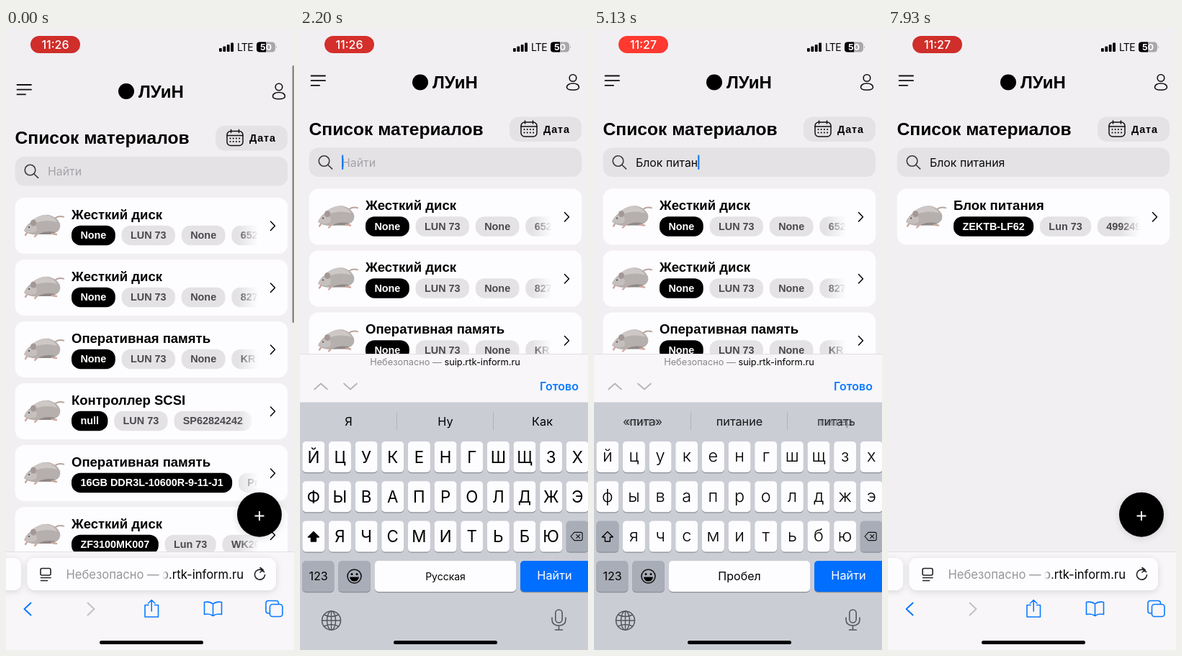
Write an HTML page that moves like this. It is 400 by 865 pixels and loops after 8000 ms.

```html
<!DOCTYPE html>
<html lang="ru">
<head>
<meta charset="utf-8">
<style>
html, body { margin: 0; width: 100%; height: 100%; overflow: hidden; background: #f2eff2; }
svg { display: block; width: 100%; height: 100%; }
text { font-family: Inter, Roboto, sans-serif; white-space: pre; }
.b { font-family: "Liberation Sans", Arial, sans-serif; font-weight: 700; }
.line { fill: none; stroke-linecap: round; stroke-linejoin: round; }
</style>
</head>
<body>
<svg id="stage" viewBox="0 0 400 865" preserveAspectRatio="none"></svg>
<script>
const LOOP = 8000, SHOW = 733, HIDE = 6030, RESULTS = 6650;
const RUSSIAN = 1500, SEARCH = 5820;
const BLUE = '#0a7aff', CARD = '#fdfcfe', GREY = '#a9adb8';
const FIELD_SIZE = 15.85;
const FIELD_FONT = `${FIELD_SIZE}px Inter, Roboto, sans-serif`;
const CHIP_FONT = '700 14.4px "Liberation Sans", Arial, sans-serif';

const pen = document.createElement('canvas').getContext('2d');
const measure = (s, font) => { pen.font = font; return pen.measureText(s).width; };
const clamp = (v) => Math.max(0, Math.min(1, v));
const mix = (a, b, k) => a + (b - a) * k;

// SVG string helpers
const text = (x, y, s, size, extra = '') => `<text x="${x}" y="${y}" font-size="${size}" ${extra}>${s}</text>`;
const mid = (x, cy, s, size, extra = '') => text(x, cy + size * 0.36, s, size, `text-anchor="middle" ${extra}`);
const box = (x, y, w, h, r, fill, extra = '') => `<rect x="${x}" y="${y}" width="${w}" height="${h}" rx="${r}" fill="${fill}" ${extra}/>`;
const line = (d, color = '#000', w = 1.7, extra = '') => `<path class="line" d="${d}" stroke="${color}" stroke-width="${w}" ${extra}/>`;
const group = (id, body, extra = '') => `<g id="${id}" ${extra}>${body}</g>`;

function rat() {
  return `<path d="M66 30Q73 24 81 27" fill="none" stroke="#b9a49d" stroke-width="1.8"/>
    <path d="M25 46Q28 38 36 33Q47 22 60 24Q71 27 75 36Q77 45 68 49L46 51Q33 53 25 46Z" fill="#b5afad"/>
    <path d="M38 30Q49 22 60 25Q68 28 71 34Q55 29 38 36Z" fill="#cdc8c6"/>
    <path d="M25 46Q29 37 38 36Q45 40 42 47Q34 51 25 46Z" fill="#c5bfbd"/>
    <ellipse cx="38" cy="35" rx="4" ry="4.500" fill="#a39896"/>
    <path d="M46 50Q56 45 68 48L66 51H46Z" fill="#8f8886"/>
    <circle cx="32" cy="41" r="1.100" fill="#4a4444"/>
    <path d="M29 49l-2 3M43 51l-3 3M64 50l6 1" stroke="#cda89f" stroke-width="2.400" stroke-linecap="round"/>`;
}

function card(y, title, chips) {
  let x = 91, row = '';
  chips.forEach((s, i) => {
    const w = measure(s, CHIP_FONT) + 24.8;
    row += box(x, 38.7, w, 27.5, 12.5, i ? '#e4e2e5' : '#000') +
      text(x + 12.4, 57.3, s, 14.4, `class="b" fill="${i ? '#4b494d' : '#fff'}"`);
    x += w + 8.8;
  });
  return `<g transform="translate(0 ${y})">${box(12.6, 0, 378.6, 78, 13, CARD)}${rat()}
    ${text(91, 29.5, title, 18.5, 'class="b"')}
    <g clip-path="url(#row)">${row}</g>${box(322, 36, 28, 33, 0, 'url(#fade)')}
    ${line('M367.5 33l6 6.2l-6 6.2', '#000', 1.5)}</g>`;
}

const items = [
  ['Жесткий диск', ['None', 'LUN 73', 'None', '652731']],
  ['Жесткий диск', ['None', 'LUN 73', 'None', '827164']],
  ['Оперативная память', ['None', 'LUN 73', 'None', 'KR 205']],
  ['Контроллер SCSI', ['null', 'LUN 73', 'SP62824242']],
  ['Оперативная память', ['16GB DDR3L-10600R-9-11-J1', 'Pr 04']],
  ['Жесткий диск', ['ZF3100MK007', 'Lun 73', 'WK2081']]
];

function header() {
  let dots = '';
  for (let i = 0; i < 8; i++) dots += `<circle cx="${311.5 + (i % 4) * 4.2}" cy="${153.5 + (i >> 2) * 4.6}" r="1"/>`;
  return line('M15.5 79h19.5M15.5 85.7h19.5M15.5 92.4h11.5', '#111', 1.8) +
    '<circle cx="167" cy="88" r="11"/>' +
    text(184, 96.5, 'ЛУиН', 24, 'class="b"') +
    `<circle class="line" cx="379" cy="82" r="4.8" stroke="#111" stroke-width="1.6"/>` +
    line('M379 89.5c-5 0-8.5 2.2-8.5 5.2s3.5 4 8.5 4s8.5-1 8.5-4s-3.5-5.2-8.5-5.2z', '#111', 1.6) +
    text(12.6, 161.3, 'Список материалов', 24.6, 'class="b"') +
    box(291, 136, 100, 34.5, 13, '#e5e2e5') +
    `<rect class="line" x="307" y="143.5" width="22" height="20" rx="5" stroke="#111" stroke-width="1.5"/>` +
    line('M307 149.5h22M312.5 141.5v4M323.5 141.5v4', '#111', 1.5) + dots +
    text(338, 158.2, 'Дата', 14.4, 'class="b" letter-spacing="0.9"') +
    box(12.6, 179, 378.6, 40.5, 13, '#e4e2e5') +
    `<circle class="line" cx="33.5" cy="197.5" r="7.3" stroke="#3b393c" stroke-width="1.6"/>` +
    line('M39 203l5.6 5.4', '#3b393c', 1.6) +
    `<text id="query" x="58" y="205" font-size="${FIELD_SIZE}"></text>` + box(58, 189, 2.2, 20.5, 1, '#1c7cf2', 'id="caret"');
}

const status = () => box(34, 11, 69, 24, 12, '#ff3b30', 'id="pill"') +
  `<text id="clock" x="68.5" y="28.7" font-size="16" font-weight="500" text-anchor="middle" fill="#fff"></text>` +
  [5, 7.5, 10, 12.5].map((h, i) => box(296 + i * 5.4, 33 - h, 3.8, h, 1, '#000')).join('') +
  text(321, 32.3, 'LTE', 14, 'letter-spacing="-0.7"') +
  box(348, 19.5, 26, 14, 4.3, '#a9a7aa') + '<path d="M361 19.5h-8.700q-4.300 0-4.300 4.300v5.400q0 4.300 4.300 4.300h8.700z"/>' +
  '<path d="M375 24.500q2 2 0 4z" fill="#a9a7aa"/>' + mid(361, 26.6, '50', 12.3, 'font-weight="700" fill="#fff"');

const tools = () => line('M34.500 799.500l-9 8.500l9 8.500', BLUE, 2) + line('M113.500 799.500l9 8.500l-9 8.500', '#c3c1c5', 2) +
  line('M198 802.500h-5v16.500h18.500v-16.500h-5M202.200 811v-15M197.500 800l4.700-4.500l4.700 4.500', BLUE, 1.6) +
  line('M287.500 801q-4.500-4-12-2.500v17q7.500-1.500 12 2q4.500-3.500 12-2v-17q-7.500-1.500-12 2.500v16.500', BLUE, 1.6) +
  `<rect class="line" x="366.500" y="801.500" width="17.500" height="17" rx="3.500" stroke="${BLUE}" stroke-width="1.600"/>` +
  line('M366 814h-1.500q-3.500 0-3.500-3.500v-10.500q0-3.500 3.500-3.500h10.500q3.500 0 3.500 3.500v1', BLUE, 1.6);

// Address card, drawn around y = 0
const address = () => group('plate',
  box(-20, -22.5, 41, 45, 10, CARD, 'filter="url(#soft)"') + box(29.5, -22.5, 345.5, 45, 11, CARD, 'filter="url(#soft)"')) +
  group('marks', `<rect class="line" x="48" y="-8" width="14" height="9.500" rx="2" stroke="#222" stroke-width="1.600"/>` +
    line('M48.5 5h13.500M48.5 9h9', '#222', 1.6) +
    line('M358.500 -3a7 7 0 1 0 1 4M353 -9l4 3l-4 3.500', '#222', 1.6)) +
  group('long', text(83.5, 6, 'Небезопасно —', 16.6, 'fill="#98969a"') +
    `<g clip-path="url(#host)">${text(330, 6, 'suip.rtk-inform.ru', 16.6, 'text-anchor="end"')}</g>` +
    box(217, -14, 13, 28, 0, 'url(#hostFade)')) +
  group('short', mid(201.5, 0, '<tspan fill="#88868a">Небезопасно — </tspan>suip.rtk-inform.ru', 12.8));

const ROWS = [575, 630.3, 685.6, 741];
const key = (x, y, w, fill = CARD, extra = '') => box(x, y + 1.2, w, 43, 5, '#8b8e96') + box(x, y, w, 43, 5, fill, extra);
const keyAt = (i) => 3.3 + 36.65 * i;

function shiftArrow(cx, cy, on) {
  return `<path d="M${cx} ${cy - 7}l7.500 7.500h-4v6h-7v-6h-4z" fill="${on ? '#000' : 'none'}" stroke="#000" stroke-width="1.300" stroke-linejoin="round"/>`;
}
const eraser = (cx, cy, k) => `<g transform="translate(${cx} ${cy}) scale(${k})">` +
  line('M-5 -8h13q3 0 3 3v10q0 3-3 3h-13l-7-8zM-1 -3.500l7 7M6 -3.500l-7 7', '#111', 1.6) + '</g>';

function letters(rows, xs, w, upper) {
  const style = `font-weight="${upper ? 400 : 300}"`;
  return rows.map((row, r) => [...row].map((c, i) => {
    const x = xs(r, i);
    return key(x, ROWS[r], w) + (upper
      ? mid(x + w / 2, ROWS[r] + 21.5, c, 22.3, style)
      : mid(x + w / 2, ROWS[r] + 20, c.toLowerCase(), 23.5, style));
  }).join('')).join('');
}

const LATIN = ['QWERTYUIOP', 'ASDFGHJKL', 'ZXCVBNM'];
const CYRILLIC = ['ЙЦУКЕНГШЩЗХ', 'ФЫВАПРОЛДЖЭ', 'ЯЧСМИТЬБЮ'];

const latin = () => letters(LATIN, (r, i) => 3.3 + 40.3 * (i + [0, 0.5, 1.5][r]), 34.6, true) +
  key(3.3, ROWS[2], 45.5) + `<g transform="translate(26 707) scale(1.4)">${shiftArrow(0, 0, true)}</g>` +
  key(355, ROWS[2], 48, GREY) + eraser(377.5, 707, 1);

const cyrillic = (upper) => letters(CYRILLIC, (r, i) => keyAt(i + (r === 2 ? 1 : 0)), 31, upper) +
  key(keyAt(0), ROWS[2], 31, upper ? CARD : GREY) + shiftArrow(18.8, 707.5, upper) +
  key(keyAt(10), ROWS[2], 31, GREY) + eraser(384.5, 707, 0.7);

function bottomRow() {
  const y = ROWS[3];
  return key(3.3, y, 44, GREY) + mid(25.5, y + 21.5, '123', 16) +
    key(53.3, y, 44.5, GREY) +
    `<circle class="line" cx="75.500" cy="762.500" r="9.500" stroke="#111" stroke-width="1.600"/>
     <circle cx="72" cy="759.500" r="1.500"/><circle cx="79" cy="759.500" r="1.500"/>
     <path d="M69 763.500h13q-1 6-6.500 6t-6.500-6z"/>` +
    key(104, y, 196, CARD, 'id="space"') +
    mid(202, y + 21, 'Пробел', 16, 'id="spaceLabel"') + mid(202, y + 22, 'Русская', 14, 'id="language"') +
    text(294, y + 37.5, 'EN FR', 10, 'id="tongues" text-anchor="end" fill="#b6b4b9" font-weight="300"') +
    key(306, y, 100, '#006eff', 'id="go"') +
    `<text id="goLabel" x="353.500" y="767" font-size="16.300" text-anchor="middle"></text>`;
}

const footer = () => `<g class="line" stroke="#55575d" stroke-width="1.500"><circle cx="43.500" cy="824" r="13"/>
  <ellipse cx="43.500" cy="824" rx="6" ry="13"/></g>` +
  line('M30.500 824h26M43.500 811v26M33.500 816q10 5 20 0M33.500 832q10-5 20 0', '#55575d', 1.4) +
  `<rect class="line" x="354.800" y="809" width="9.400" height="18" rx="4.700" stroke="#55575d" stroke-width="1.600"/>` +
  line('M350 820v2.500q0 8.500 9.500 8.500t9.500-8.500v-2.500M359.500 831v6M354.500 837h10', '#55575d', 1.6);

const keyboard = () => box(0, 520, 400, 400, 0, '#cbcdd5') + box(0, 476, 400, 44.5, 0, '#f8f6f9') +
  line('M20 502.500l9-8l9 8M61 494.500l9 8l9-8', '#b5b3b8', 1.7) +
  text(387, 504, 'Готово', 16, `text-anchor="end" font-weight="600" fill="${BLUE}"`) +
  line('M134.500 535v24M268.500 535v24', '#b0b3bb', 1) +
  box(134, 527, 135.5, 40, 6, '#e3e5ea', 'id="pick"') +
  group('hints', [0, 1].map(() => `<g>${[67.5, 202, 336.5].map((x) => mid(x, 547.5, '', 16.3)).join('')}</g>`).join('')) +
  group('latin', latin()) + group('upper', cyrillic(true)) + group('lower', cyrillic(false)) +
  bottomRow() + footer() +
  group('pop', `<path fill="${CARD}" filter="url(#soft)"/>` + mid(0, 0, '', 36, 'font-weight="300"'));

const gradient = (id, color, from, to) => `<linearGradient id="${id}"><stop stop-color="${color}" stop-opacity="${from}"/>
  <stop offset="1" stop-color="${color}" stop-opacity="${to}"/></linearGradient>`;

const stage = document.getElementById('stage');
stage.innerHTML = `<defs>${gradient('fade', CARD, 0, 1)}${gradient('hostFade', CARD, 1, 0)}
  <clipPath id="row"><rect x="91" y="30" width="258.500" height="45"/></clipPath>
  <clipPath id="host"><rect x="218" y="-20" width="120" height="40"/></clipPath>
  <filter id="soft" x="-20%" y="-40%" width="140%" height="190%"><feDropShadow dx="0" dy="2" stdDeviation="5" flood-opacity="0.130"/></filter></defs>` +
  box(0, 0, 400, 865, 0, '#f2eff2') +
  group('page', header() + group('all', items.map((it, i) => card(236 + 86 * i, ...it)).join('')) +
    group('found', card(236, 'Блок питания', ['ZEKTB-LF62', 'Lun 73', '499249']))) +
  '<circle cx="352" cy="676.700" r="31" filter="url(#soft)"/>' + line('M345.500 678.500h13M352 672v13', '#fff', 2, 'style="stroke-linecap:butt"') +
  box(397.6, 52, 3, 358, 1.5, '#89878b', 'id="scroll"') + status() +
  box(0, 728, 400, 500, 0, '#f8f6f8', 'id="bar"') + box(0, 728, 400, 0.8, 0, '#dcdade', 'id="edge"') +
  group('tools', tools()) + group('address', address()) + box(0, 453, 0, 2.6, 0, '#4ba0f2', 'id="progress"') +
  group('keyboard', keyboard()) + box(130, 852, 144, 5, 2.5, '#000');

const el = {};
stage.querySelectorAll('[id]').forEach((n) => { el[n.id] = n; });
const set = (n, attrs) => { for (const k in attrs) n.setAttribute(k, attrs[k]); };
const show = (n, on) => set(n, { opacity: +on });
const shift = (n, y) => set(n, { transform: `translate(0 ${y})` });

const PHRASE = 'Блок питания';
const PRESSES = [2480, 2790, 3060, 3320, 3570, 3850, 4120, 4390, 4660, 4930, 5200, 5480];

const HINTS = [
  [-500, 'I', 'The', 'I’m'], [RUSSIAN, 'Я', 'Ну', 'Как'],
  [2620, '«Б»', 'Была', 'Без'], [2930, '«Бл»', 'До', 'Благодарю', true],
  [3450, '«Блок»', 'Блока', 'Блоки'], [3700, 'и', 'на', 'в'], [3990, '«п»', 'по', 'при'],
  [4320, '«пи»', 'пиител', 'писать'], [4790, '«пит»', 'питание', 'питер'],
  [5060, '«пита»', 'питание', 'питать'], [5330, '«питан»', 'питания', 'питание'],
  [5610, '«питания»', 'питания', 'питание'], [5885, 'Для', 'На', 'В']
];

const spring = (ms) => ms < 0 ? 1 : (1 + 0.01826 * ms) * Math.exp(-0.01826 * ms);

function drawHints(t) {
  let n = 0;
  while (n + 1 < HINTS.length && HINTS[n + 1][0] <= t) n++;
  const k = clamp((t - HINTS[n][0]) / 140);
  [HINTS[Math.max(0, n - 1)], HINTS[n]].forEach((h, j) => {
    const g = el.hints.children[j];
    show(g, j ? clamp(k * 1.5) : (1 - k) ** 1.5);
    for (let i = 0; i < 3; i++) g.children[i].textContent = h[i + 1];
  });
  show(el.pick, HINTS[n][4] || false);
}

function drawPop(t) {
  const i = PRESSES.findIndex((p) => t >= p && t < p + 130);
  const c = PHRASE[i];
  const r = i < 0 ? -1 : CYRILLIC.findIndex((row) => row.includes(c.toUpperCase()));
  show(el.pop, r >= 0);
  if (r < 0) return;
  const x = keyAt(CYRILLIC[r].indexOf(c.toUpperCase()) + (r === 2 ? 1 : 0)), y = ROWS[r], cx = x + 15.5;
  const [shape, label] = el.pop.children;
  set(shape, { d: `M${cx - 29} ${y - 56}q0-11 11-11h36q11 0 11 11v41c0 14-13.500 14-13.500 30V${y + 38}q0 5-5 5h-21q-5 0-5-5V${y + 15}c0-16-13.500-16-13.500-30z` });
  set(label, { x: cx, y: y - 22.5, 'font-size': i ? 38 : 32 });
  label.textContent = c;
}

function draw(t) {
  const hiding = t >= HIDE;
  const r = hiding ? 1 - spring(t - HIDE) : spring(t - SHOW);   // 1 = keyboard away
  const glow = (1 - Math.cos(Math.PI * t / 1000)) / 2;
  set(el.pill, { fill: `rgb(${mix(207, 255, glow)},${mix(46, 58, glow)},${mix(42, 48, glow)})` });
  el.clock.textContent = t < 2700 ? '11:26' : '11:27';

  // Page
  shift(el.page, -12.5 * (hiding ? 1 : clamp((1 - r) * 1.2)));
  show(el.all, t < RESULTS);
  show(el.found, t >= RESULTS);
  set(el.scroll, { height: 146 + 212 * r, opacity: clamp((1350 - t) / 250) });
  const typed = PHRASE.slice(0, PRESSES.filter((p) => t >= p + 90).length);
  el.query.textContent = typed || 'Найти';
  set(el.query, { fill: typed ? '#0b0b0c' : '#a5a3a7' });
  const blink = t > 2400 || (t - 750) % 1000 < 550;
  set(el.caret, { x: 58 + measure(typed, FIELD_FONT), opacity: +(t > SHOW && !hiding && blink) });

  // Browser bar
  const top = mix(453, 728, r);
  set(el.bar, { y: top });
  set(el.edge, { y: top });
  shift(el.address, mix(464.2, 759.5, r));
  show(el.plate, clamp((r - 0.2) / 0.6));
  show(el.marks, r);
  show(el.long, clamp((r - 0.5) / 0.4));
  show(el.short, clamp((0.65 - r) / 0.3));
  show(el.tools, clamp(r * 2 - 1));
  const load = clamp((t - 5920) / 1150);
  set(el.progress, {
    x: mix(0, 32, r), y: mix(453, 779, r), width: mix(400, 340, r) * load,
    opacity: t < 5920 ? 0 : clamp((7350 - t) / 250)
  });

  // Keyboard
  shift(el.keyboard, 389 * r);
  show(el.keyboard, r < 0.999);
  const ru = t >= RUSSIAN, upper = t < PRESSES[0] + 90 || t >= SEARCH + 50;
  show(el.latin, !ru);
  show(el.upper, ru && upper);
  show(el.lower, ru && !upper);
  show(el.tongues, !ru);
  const named = clamp((2600 - t) / 200);
  show(el.language, ru ? named : 0);
  show(el.spaceLabel, ru ? 1 - named : 0);
  const spaceDown = t >= PRESSES[4] && t < PRESSES[4] + 100;
  set(el.space, { fill: spaceDown ? GREY : CARD });
  const goDown = t >= SEARCH && t < SEARCH + 90;
  set(el.go, { fill: goDown ? CARD : '#006eff' });
  set(el.goLabel, { fill: goDown ? '#000' : '#fff' });
  el.goLabel.textContent = ru ? 'Найти' : 'search';
  drawHints(t);
  drawPop(t);
}

const start = performance.now();
function tick() {
  draw((performance.now() - start) % LOOP);
  requestAnimationFrame(tick);
}
tick();
</script>
</body>
</html>
```
